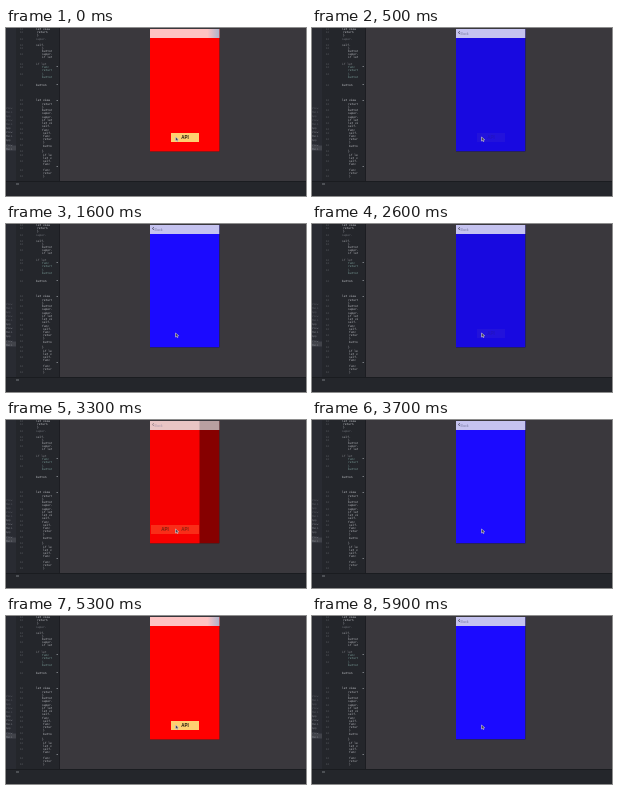
Animation of 300 by 168 pixels, one loop 6000 ms. Source, as an HTML page with a canvas:

```html
<!DOCTYPE html>
<html lang="en">
<head>
<meta charset="utf-8">
<title>Navigation push</title>
<style>
html, body { margin: 0; width: 100%; height: 100%; overflow: hidden; background: #3a383d; }
canvas { display: block; width: 300px; height: 168px; }
</style>
</head>
<body>
<canvas id="stage"></canvas>
<script>
const canvas = document.getElementById('stage');
const ratio = window.devicePixelRatio || 1;
canvas.width = 300 * ratio;
canvas.height = 168 * ratio;
const ctx = canvas.getContext('2d');
ctx.scale(ratio, ratio);

const LOOP = 6000, STEP = 100;
const TAPS = [50, 1000, 2100, 3000, 4200, 5300];
const PHONE = { x: 144, y: 1, w: 69.5, h: 122.5, bar: 9 };
const clamp = v => Math.max(0, Math.min(1, v));

function rect(x, y, w, h, color, alpha = 1) {
  ctx.globalAlpha = alpha;
  ctx.fillStyle = color;
  ctx.fillRect(x, y, w, h);
  ctx.globalAlpha = 1;
}

function text(str, x, y, size, color, { alpha = 1, font = '"DejaVu Sans Mono", monospace', align = 'left' } = {}) {
  ctx.globalAlpha = alpha;
  ctx.fillStyle = color;
  ctx.font = `${size}px ${font}`;
  ctx.textAlign = align;
  ctx.textBaseline = 'middle';
  ctx.fillText(str, x, y);
  ctx.globalAlpha = 1;
}

// Each block: first line y, line count, indent x, colour
const BLOCKS = [
  [1.5, 1, 30, '#c9cbd0'], [4.5, 2, 31, '#c9cbd0'], [11, 1, 30, '#73767d'],
  [17, 1, 30, '#a9abb0'], [20, 4, 36, '#b9bbc0'], [36, 1, 30, '#8a8c92'],
  [39.5, 4, 36, '#7fa39f'], [57, 1, 30, '#c9cbd0'], [72.5, 1, 30, '#c9cbd0'],
  [76, 4, 36, '#bfc1c6'], [89, 5, 36, '#bfc1c6'], [105, 5, 37, '#bfc1c6'],
  [123, 1, 36, '#c9cbd0'], [127, 4, 37, '#bfc1c6'], [142, 3, 37, '#b4b6bb']
];
const WORDS = ['let view', 'self.', 'func', 'return', '}', 'button', 'super.', 'if let'];

function drawEditor() {
  rect(0, 0, 300, 168, '#3a383d');
  rect(0, 0, 54, 153, '#24262b');
  rect(0, 0, 10, 153, '#292b32');
  rect(0, 117.5, 10, 5, '#41434a');
  for (let i = 0; i < 11; i++)
    text(['View', 'Main', 'App'][i % 3], 0, 80 + i * 4.1, 2.6, '#8d9097', { alpha: i < 5 ? .45 : .8 });

  ctx.save();
  ctx.beginPath();
  ctx.rect(10, 0, 36, 153);
  ctx.clip();
  BLOCKS.forEach(([y, count, x, color], block) => {
    for (let i = 0; i < count; i++) {
      const lineY = y + i * 3.2;
      text(WORDS[(block * 3 + i) % WORDS.length], x, lineY, 2.9, color);
      if (i % 2 === 0) text('12', 14, lineY, 2.4, '#777a81', { alpha: .8 });
    }
  });
  ctx.restore();

  [38, 56, 72, 138].forEach(y => rect(50.5, y, 1.5, 1, '#777a80'));
  rect(53, 0, 1, 153, '#1c1d22');
  rect(0, 153, 300, 15, '#24262b');
  rect(0, 153, 300, 1, '#1a1c20');
  rect(10, 155.5, 3, 1, '#777a80');
}

function drawButton(shift, fill, label) {
  const x = 165 - shift;
  rect(x, 105, 28 + shift, 9, '#ffd070', fill);
  const style = { alpha: label, align: 'center', font: 'bold 4.5px "Liberation Sans", sans-serif' };
  const put = (cx, alpha) => {
    ctx.globalAlpha = alpha;
    ctx.font = style.font;
    ctx.fillStyle = '#24170c';
    ctx.textAlign = 'center';
    ctx.textBaseline = 'middle';
    ctx.fillText('API', cx, 109.7);
    ctx.globalAlpha = 1;
  };
  put(179, label);
  if (shift > 0) put(179 - shift, Math.min(1, label * 1.2));
}

function drawBar(blue, fade, shift) {
  const { x, y, w, bar } = PHONE;
  if (blue) {
    rect(x, y, w, bar, '#c5c3f0');
  } else {
    const level = Math.round(255 - 38 * fade);
    rect(x, y, w, bar, `rgb(${level},${195 + 4 * fade},${195 + 4 * fade})`);
    if (shift > 0) {
      rect(x + w - shift, y, shift, bar, '#776f72', .2 + .4 * fade);
    } else {
      const tint = ctx.createLinearGradient(x + w - 12, 0, x + w, 0);
      tint.addColorStop(0, 'rgba(170,180,205,0)');
      tint.addColorStop(1, 'rgba(170,180,205,1)');
      rect(x + w - 12, y, 12, bar, tint);
    }
  }
  const alpha = blue ? 1 : fade;
  const font = '"Liberation Sans", sans-serif';
  text('‹', 146, 5, 7, '#26263a', { alpha, font });
  text('Back', 148.5, 5.5, 3.6, '#6c6e94', { alpha: alpha * .8, font });
}

function drawPhone(phase) {
  const { x, y, w, h } = PHONE;
  const blue = phase >= 450;
  const slide = 1 - (1 - clamp(phase / 180)) ** 3;
  const shift = blue ? 0 : 20 * slide;
  const fade = clamp((phase - 100) / 350);

  ctx.save();
  ctx.beginPath();
  ctx.rect(x, y, w, h);
  ctx.clip();
  rect(x, y, w, h, '#000');
  if (blue) {
    const remaining = clamp((600 - phase) / 100);
    rect(x, y, w, h, '#1b0aff');
    rect(x, y, w, h, '#000', .12 * remaining);
    drawButton(0, .045 * remaining, .12 * remaining);
  } else {
    const overlay = clamp(1.05 - phase / 570);
    rect(x - shift, y, w, h, '#ff0000');
    rect(x, y, w, h, '#000', .1 * fade);
    rect(x, y, w, h, '#ff0000', overlay);
    drawButton(shift, phase < 50 ? 1 : clamp(.5 - phase / 1050), clamp(1 - phase / 600));
  }
  drawBar(blue, fade, shift);
  ctx.restore();
}

function drawCursor() {
  ctx.beginPath();
  [[169.5, 109], [169.5, 113], [170.5, 112.2], [171.2, 113.6], [172, 113.2], [171.4, 111.8], [172.6, 111.6]]
    .forEach(([px, py]) => ctx.lineTo(px, py));
  ctx.closePath();
  ctx.fillStyle = '#34303a';
  ctx.fill();
  ctx.lineWidth = .6;
  ctx.strokeStyle = '#d8d4e0';
  ctx.stroke();
}

function render(now) {
  const time = Math.floor((now % LOOP) / STEP) * STEP;
  const tap = TAPS.filter(start => start <= time).pop() ?? time;
  drawEditor();
  drawPhone(time - tap);
  drawCursor();
}

const begin = performance.now();
function tick() {
  render(performance.now() - begin);
  requestAnimationFrame(tick);
}
tick();
</script>
</body>
</html>
```
